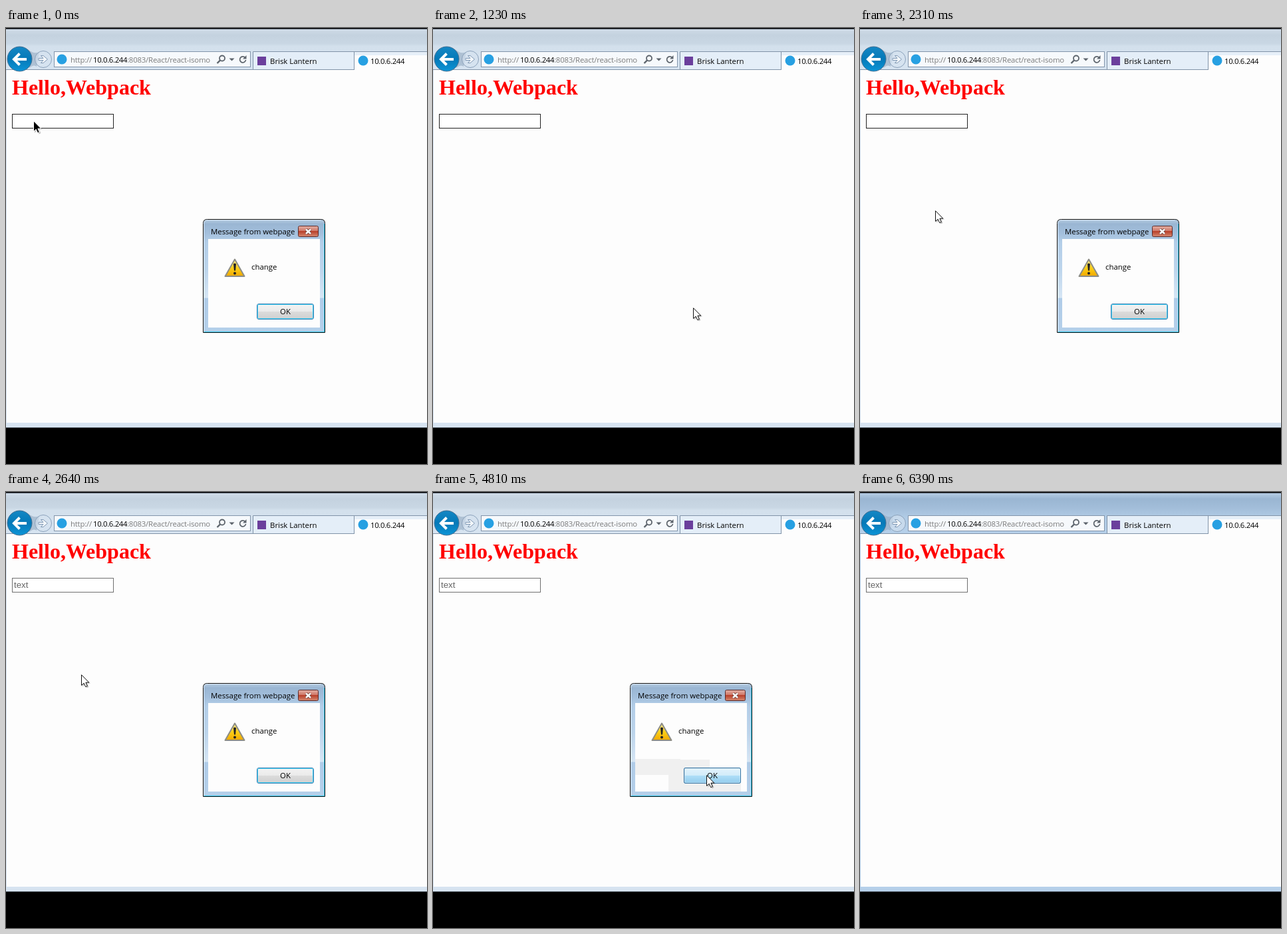
Write an HTML page that moves like this. It is 633x655 px and loops after 7360 ms.

```html
<!DOCTYPE html>
<html lang="en">
<head>
<meta charset="utf-8">
<title>Change alert</title>
<style>
  html, body { margin: 0; width: 100%; height: 100%; overflow: hidden; background: #000; }
  svg { display: block; }
  text { font: 11.4px "Open Sans", "Noto Sans", sans-serif; white-space: pre; }
  .heading { font: bold 32px "Liberation Serif", Times, serif; fill: #f00; }
  .field { font: 13.33px "Liberation Sans", Arial, sans-serif; fill: #666; }
  .muted { fill: #7b7b7b; letter-spacing: -.2px; }
  .host { letter-spacing: -.36px; }
</style>
</head>
<body>
<svg width="633" height="655" viewBox="0 0 633 655">
  <defs>
    <linearGradient id="idle" gradientUnits="userSpaceOnUse" x1="0" y1="2" x2="0" y2="62">
      <stop offset="0" stop-color="#d0dce8"/><stop offset=".14" stop-color="#c4d2df"/>
      <stop offset=".36" stop-color="#c9d7e4"/><stop offset=".42" stop-color="#d3e0ec"/>
      <stop offset="1" stop-color="#d7e4f1"/>
    </linearGradient>
    <linearGradient id="live" gradientUnits="userSpaceOnUse" x1="0" y1="2" x2="0" y2="62">
      <stop offset="0" stop-color="#b5cce3"/><stop offset=".14" stop-color="#9ab6d2"/>
      <stop offset=".36" stop-color="#a2bdd9"/><stop offset=".6" stop-color="#b0cbe5"/>
      <stop offset="1" stop-color="#b6d0ea"/>
    </linearGradient>
    <linearGradient id="blue" x2="0" y2="1">
      <stop stop-color="#1487c4"/><stop offset=".5" stop-color="#0579b8"/><stop offset="1" stop-color="#0c94d6"/>
    </linearGradient>
    <linearGradient id="frame" x2="0" y2="1">
      <stop stop-color="#b9cfe4"/><stop offset=".04" stop-color="#9ab6d3"/>
      <stop offset=".12" stop-color="#a3bfdc"/><stop offset=".2" stop-color="#b3cee8"/>
      <stop offset=".44" stop-color="#bdd5ec"/><stop offset=".69" stop-color="#d6e6f5"/>
      <stop offset=".7" stop-color="#b0cce8"/><stop offset="1" stop-color="#b5d0ea"/>
    </linearGradient>
    <linearGradient id="red" x2="0" y2="1">
      <stop stop-color="#e3b0a5"/><stop offset=".48" stop-color="#cf7565"/>
      <stop offset=".5" stop-color="#b9402a"/><stop offset="1" stop-color="#d58a72"/>
    </linearGradient>
    <linearGradient id="gold" x2="0" y2="1">
      <stop stop-color="#fff0a0"/><stop offset=".5" stop-color="#fdd017"/><stop offset="1" stop-color="#f0a800"/>
    </linearGradient>
    <linearGradient id="plain" x2="0" y2="1">
      <stop stop-color="#f2f2f2"/><stop offset=".49" stop-color="#ebebeb"/>
      <stop offset=".5" stop-color="#dcdcdc"/><stop offset="1" stop-color="#cfcfcf"/>
    </linearGradient>
    <linearGradient id="warm" x2="0" y2="1">
      <stop stop-color="#eaf6fd"/><stop offset=".49" stop-color="#d9f0fc"/>
      <stop offset=".5" stop-color="#bee6fd"/><stop offset="1" stop-color="#a7d9f5"/>
    </linearGradient>
    <linearGradient id="down" x2="0" y2="1">
      <stop stop-color="#d8eef9"/><stop offset=".49" stop-color="#c4e5f6"/>
      <stop offset=".5" stop-color="#98d1ef"/><stop offset="1" stop-color="#68b3db"/>
    </linearGradient>
    <clipPath id="urlClip"><rect x="95" y="36" width="217.5" height="23"/></clipPath>
  </defs>

  <!-- Window chrome -->
  <rect y="1" width="633" height="1" fill="#4c5560"/>
  <rect y="2" width="633" height="598" fill="url(#idle)"/>
  <rect id="active" y="2" width="633" height="598" fill="url(#live)"/>
  <rect y="600" width="633" height="1" fill="#3d444c"/>
  <rect x="1" y="63" width="632" height="530" fill="#fdfdfd"/>
  <path d="M0 62.5H633" stroke="#8193a8"/>

  <path d="M33 32Q42 40 50 36L46 58Q42 54 35 60Z" fill="#8ea5bd" opacity=".55"/>
  <circle cx="56" cy="47" r="12.5" fill="#d6e3f0" fill-opacity=".6" stroke="#8ba1ba"/>
  <path d="M49 45.5H56L52.5 41.5H56L62.5 47 56 52.500H52.5L56 48.5H49Z" fill="#f3f7fb" stroke="#8199b4"/>
  <circle cx="20.500" cy="46.500" r="18.500" fill="url(#blue)" stroke="#3f6b8e"/>
  <path d="M31 47H12M20.500 38.500L12 47 20.500 55.500" fill="none" stroke="#fff" stroke-width="4"/>

  <rect x="72.500" y="35.500" width="295" height="23" fill="#f6f9fc" stroke="#8295ab"/>
  <circle cx="84" cy="47" r="7.500" fill="#27a0e2"/>
  <g clip-path="url(#urlClip)">
    <text class="muted" x="97" y="52">http://</text>
    <text class="host" x="131" y="52">10.0.6.244</text>
    <text class="muted" x="182" y="52">:8083/React/react-isomo</text>
  </g>
  <g fill="none" stroke="#5d646c" stroke-width="1.800">
    <circle cx="325" cy="45.500" r="4"/>
    <path d="M322 48.500L317.500 53" stroke-width="2.400"/>
    <path d="M359.500 44.500A4.500 4.500 0 1 0 360.500 48"/>
  </g>
  <path d="M335.500 45.500H343.500L339.500 49.500ZM361.500 41V46.500H356Z" fill="#5d646c"/>

  <path d="M371.500 62V35.500H523.500V62" fill="#e4eef8" stroke="#8193a8"/>
  <rect x="378" y="43" width="13" height="13" fill="#6b3f9c"/>
  <text x="397" y="54">Brisk Lantern</text>
  <rect x="524" y="36" width="109" height="27" fill="#fdfdfd"/>
  <rect x="524" y="36" width="109" height="5" fill="#e6eff8"/>
  <path d="M523.500 63V35.500H633" fill="none" stroke="#8193a8"/>
  <circle cx="537" cy="49" r="7.500" fill="#27a0e2"/>
  <text class="host" x="548" y="54">10.0.6.244</text>

  <!-- Page -->
  <text class="heading" x="9" y="100">Hello,Webpack</text>
  <rect x="9.500" y="129.500" width="152" height="21" fill="#fff" stroke="#222"/>
  <g id="filled">
    <rect x="9.500" y="129.500" width="152" height="21" fill="#fff" stroke="#707070"/>
    <text class="field" x="12" y="144">text</text>
  </g>

  <!-- Alert -->
  <g id="alert">
    <path d="M296.500 457.500V293.500Q296.500 287.500 302.500 287.500H473.500Q479.500 287.500 479.500 293.500V457.500Z" fill="url(#frame)" stroke="#111"/>
    <path d="M297.500 456V294Q297.500 288.500 303 288.500H473" fill="none" stroke="#e3eef8" opacity=".8"/>
    <path d="M478.500 294V456.500H298" fill="none" stroke="#35cdf0"/>
    <rect x="304" y="317" width="168" height="133" fill="#fdfdfd"/>
    <text x="308" y="310">Message from webpage</text>
    <rect x="439.500" y="297.500" width="30" height="16" rx="2" fill="url(#red)" stroke="#5b2b2b"/>
    <g fill="none">
      <path d="M451 302.500L458 309M458 302.500L451 309" stroke="#6a4440" stroke-width="4.200"/>
      <path d="M451 302.500L458 309M458 302.500L451 309" stroke="#fff" stroke-width="2.400"/>
    </g>
    <path d="M344 347.500L358.500 373H329.500Z" fill="url(#gold)" stroke="#8d8d86" stroke-width="2" stroke-linejoin="round"/>
    <path d="M342 354.500Q344 352.500 346 354.500L345 364.500H343Z" fill="#222"/>
    <circle cx="344" cy="368.500" r="2" fill="#222"/>
    <text x="369" y="363">change</text>
    <g fill="#f0f0f0">
      <rect id="patchA" x="304" y="401" width="68" height="24"/>
      <rect id="patchB" x="354" y="402" width="62" height="48"/>
      <rect id="patchC" x="398" y="430" width="65" height="20"/>
    </g>
    <g stroke-width="1">
      <rect x="377.500" y="414.500" width="85" height="23" rx="2.500" fill="url(#plain)" stroke="#3c7fb1"/>
      <rect x="378.500" y="415.500" width="83" height="21" rx="1.500" fill="none" stroke="#3fcdf2"/>
      <g id="hover">
        <rect x="377.500" y="414.500" width="85" height="23" rx="2.500" fill="url(#warm)" stroke="#3c7fb1"/>
        <rect x="378.500" y="415.500" width="83" height="21" rx="1.500" fill="none" stroke="#f0faff" opacity=".8"/>
      </g>
      <g id="press">
        <rect x="377.500" y="414.500" width="85" height="23" rx="2.500" fill="url(#down)" stroke="#2c628b"/>
        <path d="M378.500 436V415.500H461.500" fill="none" stroke="#86a9bd" opacity=".7"/>
      </g>
    </g>
    <text x="420" y="430" text-anchor="middle">OK</text>
  </g>

  <g id="cursor">
    <path d="M2 2V18.500L6 15 8.500 20.500 11.500 19 9 13.500H14Z" fill="#000" opacity=".22"/>
    <path id="arrow" d="M.5 .7V16.500L4.200 13.200 6.700 18.700 9.300 17.500 6.900 12.200H11.800Z" fill="#fff" stroke="#111"/>
  </g>
</svg>
<script>
const LOOP = 7360;
const $ = id => document.getElementById(id);
const smooth = k => k * k * (3 - 2 * k);
const easeOut = k => 1 - (1 - k) ** 2;

// Each row [time, value] holds until the next one.
function play(id, prop, rows) {
  const frames = rows.map(([t, v]) => ({ offset: t / LOOP, [prop]: v, easing: "steps(1, end)" }));
  frames.push({ offset: 1, [prop]: rows.at(-1)[1] });
  $(id).animate(frames, { duration: LOOP, iterations: Infinity });
}

const at = (t, x, y) => [t, `translate(${x}px, ${y}px)`];

// Evenly timed stops after the start point, ending at t1.
function glide(t0, t1, count, [x0, y0], [x1, y1], ease) {
  return Array.from({ length: count }, (_, i) => {
    const k = ease((i + 1) / count);
    const t = t0 + (t1 - t0) * i / (count - 1);
    return at(t, Math.round(x0 + (x1 - x0) * k), Math.round(y0 + (y1 - y0) * k));
  });
}

play("cursor", "transform", [
  at(0, 41, 139),
  ...glide(90, 780, 11, [41, 139], [394, 420], smooth),
  at(1230, 391, 420),
  ...glide(1320, 1740, 6, [391, 420], [113, 274], smooth),
  at(2760, 236, 342), at(2850, 354, 402), at(2940, 398, 430), at(3020, 445, 440),
  ...glide(3170, 3490, 6, [445, 440], [411, 425], easeOut),
  at(5830, 442, 445),
  ...glide(5920, 6390, 7, [442, 445], [500, 660], easeOut)
]);
play("arrow", "fill", [[0, "#000"], [90, "#fff"]]);
play("arrow", "stroke", [[0, "#fff"], [90, "#111"]]);

play("active", "opacity", [[0, 0], [1320, 1], [2310, 0], [6230, 1]]);
play("filled", "opacity", [[0, 0], [2640, 1]]);
play("alert", "opacity", [[0, 1], [980, .4], [1050, 0], [2310, 1], [5920, .4], [6000, 0]]);
play("hover", "opacity", [[0, 0], [711, .5], [780, 1], [1050, 0], [3170, .3], [3234, .6], [3298, 1], [6000, 0]]);
play("press", "opacity", [[0, 0], [840, .5], [910, 1], [1050, 0], [4810, .35], [4870, .7], [4930, 1], [6000, 0]]);
play("patchA", "opacity", [[0, 0], [2850, 1], [6000, 0]]);
play("patchB", "opacity", [[0, 0], [2940, 1], [6000, 0]]);
play("patchC", "opacity", [[0, 0], [3020, 1], [6000, 0]]);
</script>
</body>
</html>
```
